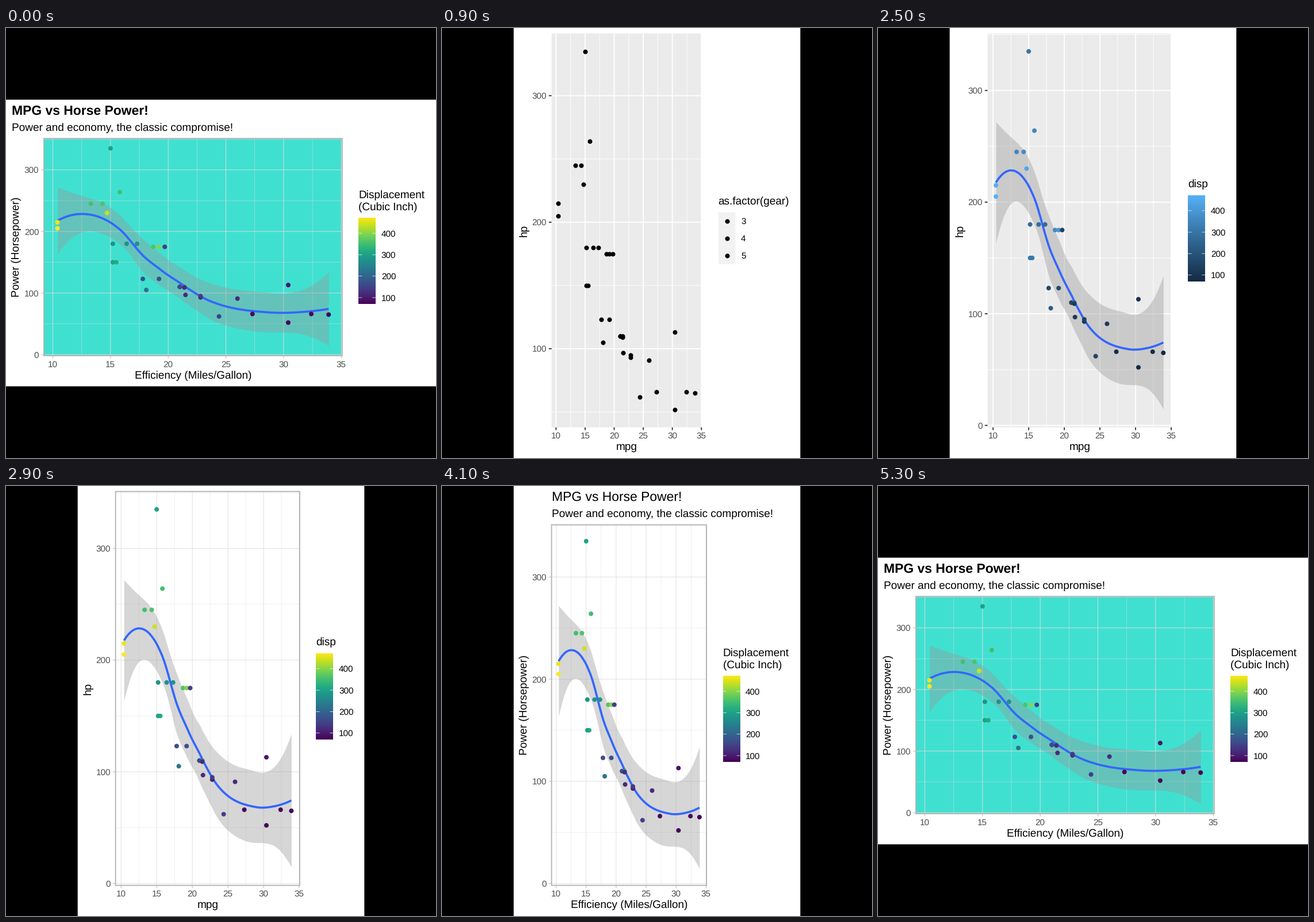
These frames come from a looping animation (748x748 px, 8 s). A matplotlib script:

```python
import numpy as np
import matplotlib.pyplot as plt
from matplotlib.animation import FuncAnimation
from matplotlib.colors import LinearSegmentedColormap
from matplotlib.patches import Rectangle

STAGE = 748
PT = STAGE / 432            # pixels per point on a 6 inch stage
SHORT = STAGE * 2 / 3
EDGE = (STAGE - SHORT) / 2
HALF = 5.5 * PT             # half a line of text
KEY = 17.28 * PT
INTERVAL, LOOP = 100, 8000

plt.rcParams.update({"font.family": "Liberation Sans", "path.snap": False,
                     "text.hinting": "none"})

MPG = np.array([21, 21, 22.8, 21.4, 18.7, 18.1, 14.3, 24.4, 22.8, 19.2, 17.8,
                16.4, 17.3, 15.2, 10.4, 10.4, 14.7, 32.4, 30.4, 33.9, 21.5,
                15.5, 15.2, 13.3, 19.2, 27.3, 26, 30.4, 15.8, 19.7, 15, 21.4])
HP = np.array([110, 110, 93, 110, 175, 105, 245, 62, 95, 123, 123, 180, 180,
               180, 205, 215, 230, 66, 52, 65, 97, 150, 150, 245, 175, 66, 91,
               113, 264, 175, 335, 109])
DISP = np.array([160, 160, 108, 258, 360, 225, 360, 146.7, 140.8, 167.6, 167.6,
                 275.8, 275.8, 275.8, 472, 460, 440, 78.7, 75.7, 71.1, 120.1,
                 318, 304, 350, 400, 79, 120.3, 95.1, 351, 145, 301, 121])
GEAR = [int(g) for g in "44433334444333333444333334555554"]

GEAR_COLORS = {3: "#F8766D", 4: "#00BA38", 5: "#619CFF"}
BLUES = LinearSegmentedColormap.from_list("blues", ["#132B43", "#336A98", "#56B1F7"])
VIRIDIS = plt.get_cmap("viridis")

GREY = dict(panel="#EBEBEB", grid="white", major=1.067, tick="#333333", border=None)
LIGHT = dict(panel="white", grid="#DEDEDE", major=0.533, tick="#B3B3B3", border="#B3B3B3")
TURQUOISE = dict(LIGHT, panel="#40E0D0")


def cell_cuts(xs, low, high, min_width):
    """Cut points of a k-d tree holding at most four values per cell."""
    if len(xs) <= 4 or high - low <= min_width:
        return []
    m = (len(xs) - 1) // 2
    for off in (0, 1, -1, 2, -2):
        if 0 <= m + off < len(xs) - 1 and xs[m + off] != xs[m + off + 1]:
            m += off
            break
    cut = (xs[m] + xs[m + 1]) / 2
    return (cell_cuts(xs[:m + 1], low, cut, min_width) + [cut]
            + cell_cuts(xs[m + 1:], cut, high, min_width))


def loess(x, y, at, span=0.75):
    """Local quadratic fit with a 95% band, blended between tree vertices."""
    n, xs = len(x), sorted(x)
    pad = 0.005 * (xs[-1] - xs[0])
    low, high = xs[0] - pad, xs[-1] + pad
    knots = np.array([low, *cell_cuts(xs, low, high, 0.05 * (high - low)), high])

    def local_rows(z):
        d = np.abs(x - z)
        reach = np.sort(d)[int(span * n) - 1]
        root = np.sqrt(np.clip(1 - (d / reach) ** 3, 0, 1) ** 3)
        basis = np.vander(x - z, 3, increasing=True)
        return (np.linalg.pinv(root[:, None] * basis) * root)[:2]

    rows = np.array([local_rows(z) for z in knots])
    value, slope = rows[:, 0], rows[:, 1]

    def smoother(v):
        i = np.clip(np.searchsorted(knots, v) - 1, 0, len(knots) - 2)
        h = (knots[i + 1] - knots[i])[:, None]
        t = (v - knots[i])[:, None] / h
        return ((1 + 2 * t) * (1 - t) ** 2 * value[i] + t * (1 - t) ** 2 * h * slope[i]
                + t * t * (3 - 2 * t) * value[i + 1] + t * t * (t - 1) * h * slope[i + 1])

    rest = np.eye(n) - smoother(x)
    delta = rest @ rest.T
    d1, d2 = np.trace(delta), np.trace(delta @ delta)
    sigma = np.sqrt(np.sum((rest @ y) ** 2) / d1)
    df, z = d1 ** 2 / d2, 1.959964
    quantile = z + (z ** 3 + z) / (4 * df) + (5 * z ** 5 + 16 * z ** 3 + 3 * z) / (96 * df ** 2)
    op = smoother(at)
    return op @ y, quantile * sigma * np.linalg.norm(op, axis=1)


FIT_X = np.linspace(10.4, 33.9, 80)
FIT_Y, FIT_BAND = loess(MPG, HP, FIT_X)


def text(ax, x, y, s, size=11, **kw):
    ax.text(x, y, s, fontsize=size, va="baseline", **kw)


def rect(ax, x, y, w, h, color, **kw):
    ax.add_patch(Rectangle((x, y), w, h, fc=color, lw=0, **kw))


def dots(ax, x, y, color):
    ax.scatter(x, y, s=4.62 ** 2, c=color, linewidths=0, zorder=2)


def legend_title(ax, x, bottom, lines):
    baseline = bottom - HALF - 0.212 * 11 * PT
    for k, line in enumerate(reversed(lines)):
        text(ax, x, baseline - k * 0.9 * 1.2 * 11 * PT, line)


def legend_top(middle, lines, body):
    head = (0.928 + 1.08 * (len(lines) - 1)) * 11 * PT + HALF
    return middle - (head + body) / 2 + head


def gear_legend(ax, x, middle, lines, colors):
    top = legend_top(middle, lines, 3 * KEY)
    legend_title(ax, x, top, lines)
    rect(ax, x, top, KEY, 3 * KEY, "#F2F2F2")
    for k, gear in enumerate((3, 4, 5)):
        y = top + (k + 0.5) * KEY
        dots(ax, [x + KEY / 2], [y], [colors[gear]])
        text(ax, x + KEY + HALF, y + 5.45, str(gear), 8.8)


def bar_legend(ax, x, middle, lines, cmap):
    height = 5 * KEY
    top = legend_top(middle, lines, height)
    legend_title(ax, x, top, lines)
    ax.imshow(cmap(np.linspace(1, 0, 256))[:, None], aspect="auto",
              extent=(x, x + KEY, top + height, top), zorder=1)
    for v in (100, 200, 300, 400):
        y = top + height * (DISP.max() - v) / np.ptp(DISP)
        for a in (x, x + 0.8 * KEY):
            ax.plot([a, a + 0.2 * KEY], [y, y], color="white", lw=0.4,
                    solid_capstyle="butt")
        text(ax, x + KEY + HALF, y + 5.45, str(v), 8.8)


def draw_scene(ax, wide=False, theme=GREY, scale="black", layers=("points",),
               legend=None, legend_width=0, title=None, x_name="mpg", y_name="hp"):
    x0, y0 = (0, EDGE) if wide else (EDGE, 0)
    width, height = (STAGE, SHORT) if wide else (SHORT, STAGE)
    rect(ax, x0, y0, width, height, "white", zorder=0)

    left, right = x0 + 65.9, x0 + width - HALF
    if legend:
        legend_x = right - HALF - legend_width
        right = legend_x - 3 * HALF
    top = y0 + (67.46 if title else HALF)
    bottom = y0 + height - 53.3
    middle = (top + bottom) / 2
    low, high = (-1.74, 351.04) if "smooth" in layers else (37.85, 349.15)

    def px(v):
        return left + (np.asarray(v) - 9.225) / 25.85 * (right - left)

    def py(v):
        return bottom - (np.asarray(v) - low) / (high - low) * (bottom - top)

    rect(ax, left, top, right - left, bottom - top, theme["panel"], zorder=0)
    x_major = range(10, 36, 5)
    y_major = [v for v in range(0, 301, 100) if v > low]
    grids = ((np.arange(12.5, 33, 5), [v for v in range(50, 351, 100) if v < high], 0.5),
             (x_major, y_major, 1))
    for xs, ys, weight in grids:
        style = dict(color=theme["grid"], lw=theme["major"] * weight, zorder=1)
        ax.vlines(px(xs), top, bottom, **style)
        ax.hlines(py(ys), left, right, **style)

    if scale == "black":
        gear_colors, colors = dict.fromkeys(GEAR_COLORS, "black"), "black"
    elif scale == "gear":
        gear_colors, colors = GEAR_COLORS, [GEAR_COLORS[g] for g in GEAR]
    else:
        colors = scale((DISP - DISP.min()) / np.ptp(DISP))

    for layer in layers:
        if layer == "points":
            dots(ax, px(MPG), py(HP), colors)
        elif layer == "path":
            ax.plot(px(MPG), py(HP), color="black", lw=1.067, zorder=2,
                    solid_joinstyle="round", solid_capstyle="butt")
        else:
            ax.fill_between(px(FIT_X), py(FIT_Y - FIT_BAND), py(FIT_Y + FIT_BAND),
                            color="#999999", alpha=0.4, lw=0, zorder=2)
            ax.plot(px(FIT_X), py(FIT_Y), color="#3366FF", lw=2.134, zorder=2,
                    solid_joinstyle="round", solid_capstyle="butt")

    if theme["border"]:
        ax.add_patch(Rectangle((left, top), right - left, bottom - top, fill=False,
                               ec=theme["border"], lw=1.067, zorder=3))
    tick = 2.75 * PT
    style = dict(color=theme["tick"], lw=theme["major"], zorder=3)
    ax.vlines(px(x_major), bottom, bottom + tick, **style)
    ax.hlines(py(y_major), left - tick, left, **style)
    for v in x_major:
        text(ax, px(v), bottom + 19.5, str(v), 8.8, ha="center", color="#4D4D4D")
    for v in y_major:
        text(ax, left - 1.8 * tick, py(v) + 5.45, str(v), 8.8, ha="right", color="#4D4D4D")

    text(ax, (left + right) / 2, y0 + height - 13.6, x_name, ha="center")
    text(ax, x0 + 23.1, middle, y_name, ha="center", rotation=90, rotation_mode="anchor")
    if title:
        title_x = left if title == "panel" else x0 + HALF
        text(ax, title_x, y0 + 25.9, "MPG vs Horse Power!", 13.2,
             weight="normal" if title == "panel" else "bold")
        text(ax, title_x, y0 + 53.9, "Power and economy, the classic compromise!")
    if legend and scale in ("black", "gear"):
        gear_legend(ax, legend_x, middle, legend, gear_colors)
    elif legend:
        bar_legend(ax, legend_x, middle, legend, scale)


gear = dict(legend=["as.factor(gear)"], legend_width=123.7)
disp = dict(scale=BLUES, legend=["disp"], legend_width=64.8)
light = dict(disp, scale=VIRIDIS, theme=LIGHT, layers=("smooth", "points"))
named = dict(light, title="panel", legend=["Displacement", "(Cubic Inch)"],
             legend_width=115.6, x_name="Efficiency (Miles/Gallon)",
             y_name="Power (Horsepower)")
bold = dict(named, wide=True, title="plot")
finished = dict(bold, theme=TURQUOISE)

TIMELINE = [
    (0, finished),
    (500, {}),
    (900, gear),
    (1300, dict(gear, scale="gear")),
    (1700, dict(gear, scale="gear", layers=("points", "path"))),
    (2100, dict(disp, layers=("points", "smooth"))),
    (2500, dict(disp, layers=("smooth", "points"))),
    (2900, light),
    (3300, dict(light, title="panel")),
    (4100, named),
    (4500, dict(named, wide=True)),
    (4900, bold),
    (5300, finished),
]
STARTS = [start for start, _ in TIMELINE]

fig = plt.figure(figsize=(6, 6), dpi=STAGE / 6, facecolor="black")
scenes = []
for _, spec in TIMELINE:
    ax = fig.add_axes([0, 0, 1, 1])
    ax.set(xlim=(0, STAGE), ylim=(STAGE, 0))
    ax.axis("off")
    draw_scene(ax, **spec)
    ax.set(xlim=(0, STAGE), ylim=(STAGE, 0))
    scenes.append(ax)


def update(frame):
    current = np.searchsorted(STARTS, frame * INTERVAL, side="right") - 1
    for k, ax in enumerate(scenes):
        ax.set_visible(k == current)
    return scenes


anim = FuncAnimation(fig, update, frames=LOOP // INTERVAL, interval=INTERVAL,
                     init_func=lambda: update(0), repeat=True, repeat_delay=0)
plt.show()
```
